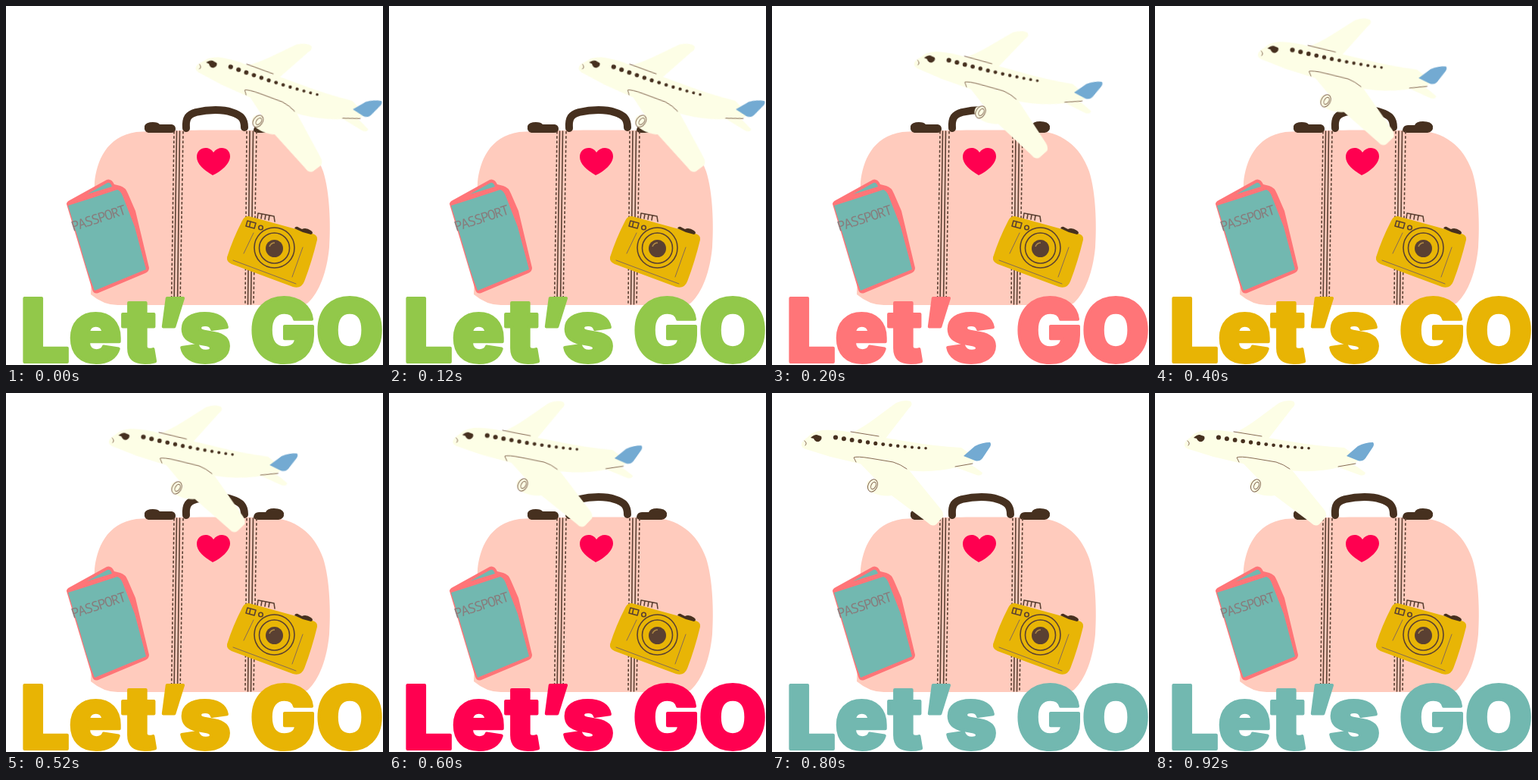
An HTML page for the animation above (1000 ms loop, 498 px wide and 473 px high).

```html
<!DOCTYPE html>
<html lang="en">
<head>
<meta charset="utf-8">
<title>Let’s GO</title>
<style>
  html, body { margin: 0; width: 100%; height: 100%; overflow: hidden; background: #fff; }
  svg { display: block; width: 498px; height: 473px; }
  .line { fill: none; stroke: #5a4032; stroke-width: 1.6; stroke-linecap: round; stroke-linejoin: round; }
  .thin { stroke-width: 1; stroke: #866a55; }
  .stitch { stroke-dasharray: 3.6 2.6; stroke-linecap: butt; }
  .dark { fill: #46301f; }
  .ivory { fill: #fdfee6; }
  #title {
    font: 900 115px Inter, "Open Sans", sans-serif;
    text-anchor: middle;
    fill: #92c84a; stroke: currentColor; color: #92c84a;
    stroke-width: 4; stroke-linejoin: round;
  }
  #label {
    font: 400 18px "Noto Sans Mono", "DejaVu Sans Mono", monospace;
    letter-spacing: -1.6px; fill: #877d7d;
  }
</style>
</head>
<body>
<svg viewBox="0 0 498 473">
  <g id="suitcase">
    <path fill="#ffcbbd" d="M117 232C120 205 132 172 172 166C205 163 300 163 345 164C382 165 407 184 419 218C428 246 429 290 427 318C424 350 414 377 399 391Q394 395 384 394H150Q130 395 112 380Z"/>
    <path fill="none" stroke="#46301f" stroke-width="10" stroke-linecap="round" d="M238 161C237 147 241 143 251 140C268 136 287 136 298 140C311 144 315 149 315 160"/>
    <path class="dark" d="M183 158Q185 153 194 153Q201 153 203 156H219Q224 157 224 162Q224 167 218 167H188Q182 166 183 158Z"/>
    <path class="dark" d="M327 163Q328 157 334 157H343Q345 152 354 152Q365 152 367 158Q368 166 360 167H333Q327 167 327 163Z"/>
    <g class="line">
      <path class="stitch" d="M222 165L218.500 393M234 165L230 393M318 165L316 393M331 165L327 393"/>
      <path d="M225.500 165L222 393M229.500 165L226.500 393M322 165L319.500 393M326.500 165L323.500 393"/>
    </g>
    <path fill="#ff0050" d="M273 223C261 216 252 208 252 199C252 186 268 183 274 193C281 183 296 186 296 198C296 208 284 218 273 223Z"/>
  </g>

  <g id="passport">
    <path fill="#ff7578" d="M80 261Q80 258 84 256L133 229Q139 227 143 235L151 237Q158 239 161 247L171 270L189 345Q189 350 184 352L122 378Q116 380 114 374Z"/>
    <path fill="#72b8b0" d="M107 248L134 233Q138 232 140 238Z"/>
    <path fill="#72b8b0" d="M82 263Q114 253 147 242Q151 243 154 250L170 291L185 347L117 375Q106 346 99 319Z"/>
    <text id="label" transform="translate(88.500 297) rotate(-18)">PASSPORT</text>
  </g>

  <g id="camera">
    <path class="line" d="M332 280L333 273L354 277L355 284M338 274L337 280M343 275L342 281M348 276L347 282"/>
    <path fill="#e8b506" d="M321 277Q315 276 312 283Q300 306 292 331Q291 337 298 340L379 370Q390 373 394 363Q404 337 411 308Q412 302 405 300Z"/>
    <path class="dark" d="M381 293Q383 289 387 292L391 294Q396 291 403 296Q407 299 403 301L392 298Z"/>
    <path class="line" d="M319 283L330 286L328 293L317 290ZM323 284L321.500 291"/>
    <circle class="line" cx="336.500" cy="292" r="2.800"/>
    <path class="line thin" d="M327 299L314 326M392 318L378 357M300 335L383 366"/>
    <circle class="line" cx="354.500" cy="318.500" r="26.500"/>
    <circle class="line" cx="354.500" cy="319" r="20"/>
    <circle cx="354.500" cy="319.500" r="11.500" fill="#5a4032"/>
    <path d="M348 317Q350 312 355 312" fill="none" stroke="#b18b45" stroke-width="1.500"/>
  </g>

  <g id="plane">
    <g transform="translate(-39 -67)">
      <path class="ivory" d="M106 52C124 44 140 30 164 13Q175 8 183 11Q187 15 181 20L150 60Z"/>
      <path class="ivory" d="M39 67Q40 63 46 59Q53 51 66 49Q84 48 105 52L180 64Q214 70 250 72L270 86Q266 92 262 94Q270 99 278 105Q277 110 270 108L243 98Q220 104 192 103Q155 102 120 94L77 84L48 75Q38 73 39 67Z"/>
      <path class="ivory" d="M108 84Q145 84 178 98L223 153Q227 158 226 163L217 173Q212 177 206 171L158 135Q145 137 132 131Q122 126 126 117Q130 113 137 114Z"/>
      <path fill="#73aad2" d="M253 83L268 70Q278 65 288 65Q290 67 288 71L278 86Q274 91 268 89Z"/>
      <path class="dark" d="M51 59Q55 55 59 55L65 57Q67 61 62 64Q57 65 55 60Z"/>
      <g id="windows" class="dark"></g>
      <g class="line thin">
        <path d="M104 51L141 57M111 91L108 85Q112 83 130 86L160 91Q170 94 178 100M242 97L265 93M43 63Q47 66 44 69"/>
        <ellipse cx="133" cy="122" rx="6" ry="8.500" transform="rotate(25 133 122)"/>
        <ellipse cx="134" cy="122" rx="3" ry="5" transform="rotate(25 134 122)"/>
      </g>
    </g>
  </g>

  <text id="title" y="469" x="51.500 118 176 218.500 263 297 366 454">Let’s GO</text>
</svg>
<script>
  const $ = id => document.getElementById(id);

  // nose x, nose y, tilt in degrees, title colour
  const steps = [
    [251, 80, 10.9, '#92c84a'],
    [188, 75, 6.2, '#ff7578'],
    [136, 63, 4.3, '#e8b404'],
    [84.5, 63, 1.9, '#ff0050'],
    [39, 67, 0, '#72b8b0']
  ];

  // cabin windows shrink towards the tail
  for (let i = 0; i < 13; i++) {
    const dot = document.createElementNS('http://www.w3.org/2000/svg', 'circle');
    dot.setAttribute('cx', 84 + 11 * i - 0.09 * i * i);
    dot.setAttribute('cy', 58.5 + 1.85 * i - 0.055 * i * i);
    dot.setAttribute('r', 3.1 - 0.11 * i);
    $('windows').append(dot);
  }

  function play(el, pose) {
    const frames = [...steps, steps[steps.length - 1]].map((step, i) => ({
      ...pose(step), offset: i / steps.length, easing: 'steps(1, end)'
    }));
    el.animate(frames, { duration: 1000, iterations: Infinity });
  }

  play($('plane'), ([x, y, tilt]) => ({ transform: `translate(${x}px, ${y}px) rotate(${tilt}deg)` }));
  play($('title'), ([, , , color]) => ({ fill: color, color }));
</script>
</body>
</html>
```
